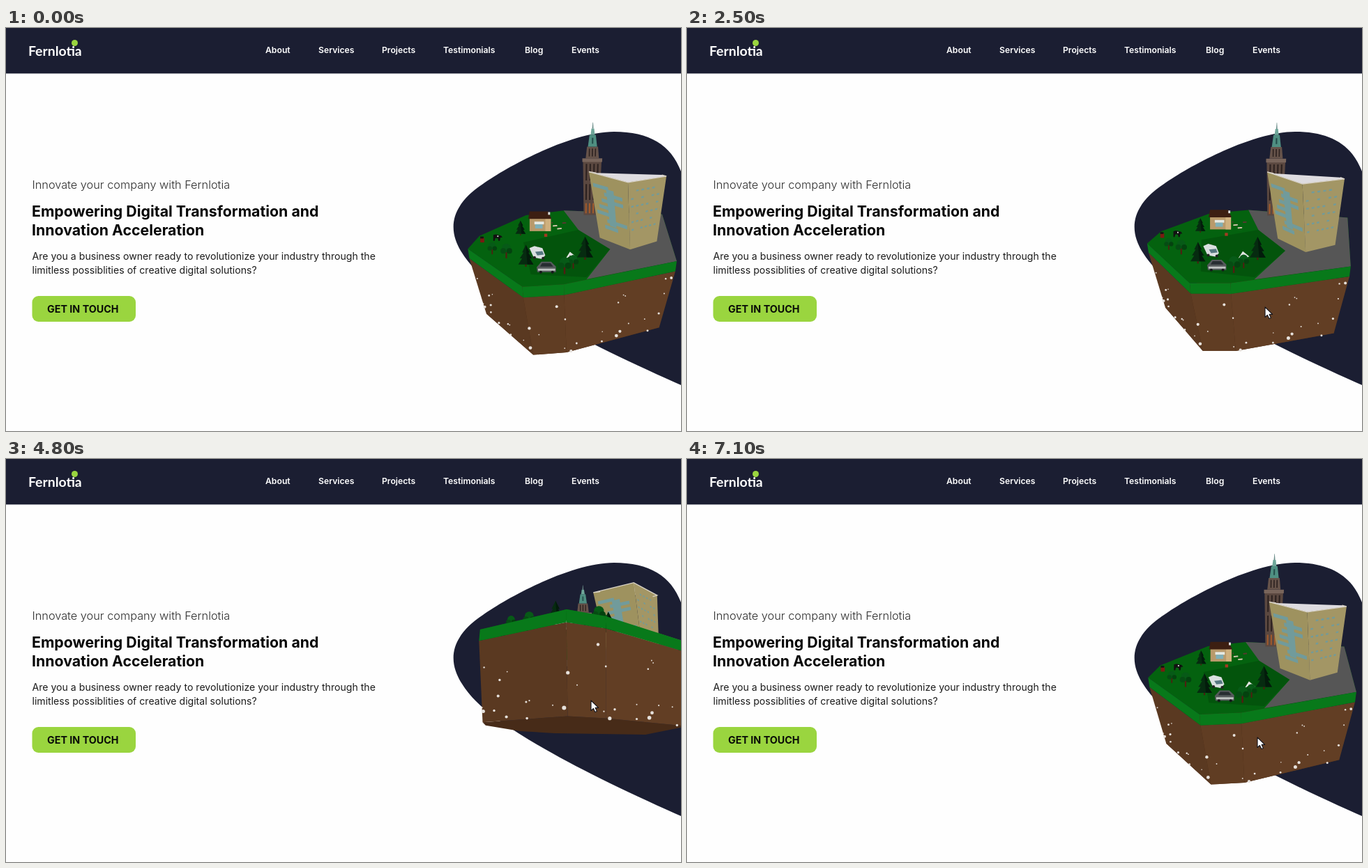
Animation, 968 px wide and 579 px high, one loop 7.2 s. Source, as an HTML page:

```html
<!DOCTYPE html>
<html lang="en">
<head>
<meta charset="utf-8">
<title>Fernlotia</title>
<style>
html, body { margin: 0; width: 100%; height: 100%; overflow: hidden; background: #fefefe; }
svg { display: block; width: 968px; height: 579px; font-family: Inter, sans-serif; }
.nav { font-size: 12.2px; font-weight: 600; fill: #fff; }
.head { font-size: 21.3px; font-weight: 700; fill: #060606; }
.body { font-size: 14.1px; fill: #1c1c1c; }
</style>
</head>
<body>
<svg viewBox="0 0 968 579">
  <rect width="968" height="579" fill="#fefefe"/>
  <rect width="968" height="65.4" fill="#1b1e32"/>
  <text x="32" y="40" font-size="19.4" font-weight="700" fill="#fff" style="font-family:Lato,sans-serif">Fernlotia</text>
  <circle cx="98.5" cy="21.5" r="4.5" fill="#9ad53f"/>
  <g class="nav">
    <text x="372" y="36">About</text><text x="448" y="36">Services</text>
    <text x="539" y="36">Projects</text><text x="627" y="36">Testimonials</text>
    <text x="744" y="36">Blog</text><text x="811" y="36">Events</text>
  </g>
  <text x="37.5" y="230.5" font-size="16.3" font-weight="300" fill="#2c2c2c">Innovate your company with Fernlotia</text>
  <g class="head">
    <text x="37" y="271">Empowering Digital Transformation and</text>
    <text x="37" y="297.5">Innovation Acceleration</text>
  </g>
  <g class="body">
    <text x="37.5" y="332.5">Are you a business owner ready to revolutionize your industry through the</text>
    <text x="37.5" y="353">limitless possiblities of creative digital solutions?</text>
  </g>
  <rect x="37.5" y="385" width="148.5" height="37" rx="9" fill="#9ad53f"/>
  <text x="59" y="408.8" font-size="14.3" font-weight="700" fill="#0a0d08">GET IN TOUCH</text>
  <path d="M970 212C957 170 925 149 872 149C812 149 722 197 684 224C630 260 638 296 652 320C665 342 685 360 708 376C770 420 862 466 970 514Z" fill="#1b1e32"/>
  <g id="scene"></g>
  <path id="cursor" d="M0 0V14.5L3.4 11.4L5.8 16.6L8.4 15.4L6.1 10.4H10.6Z" fill="#fff" stroke="#15151c" stroke-width="1.1" stroke-linejoin="round"/>
</svg>
<script>
const scene = document.getElementById('scene');
const cursor = document.getElementById('cursor');

// Time, yaw and pitch in degrees, pointer x and y.
const keys = [
  [0, 0, 25, 818, 401],
  [1300, -7, 25, 801, 399],
  [1900, 5, 26, 822, 403],
  [2500, -6, 25, 829, 401],
  [2900, 9, 28, 850, 402],
  [3900, 26, 12, 846, 371],
  [4800, 17, -17, 839, 347],
  [5600, 9, -5, 825, 377],
  [6450, 0, 28, 824, 406],
  [7100, -1.5, 23.8, 818, 400],
  [7200, -1.5, 23.8, 818, 400]
];

// Ground plans as x,z; z points to the viewer, y is up.
const rim = [[-160, 80], [-67, 175], [-17, 170], [135, 115], [151, -49], [-26, -66], [-92, -44], [-154, 38]];
const road = [[-26, -66], [151, -49], [135, 115], [11, 159], [47, 81], [1, 16]];
const glade = [[1, 16], [47, 81], [11, 154], [-60, 148], [-82, 60]];
const TURF = -16, BOTTOM = -121;
const TOWER = { x: 24, z: -45, h: 160 };
const ROOF = 103;
// Things on the grass, back to front: kind, x, z, size.
const things = [
  ['crowd', -31, 10, 1], ['house', -61, 21, 1.1], ['pine', -90, 36, .8], ['cow', -124, 48, 1],
  ['barn', -144, 60, 1], ['tree', -121, 96, .7], ['tree', -99, 107, .85], ['van', -56, 107, 1],
  ['tent', -9, 109, .9], ['pine', 10, 111, 1.1], ['pine', -69, 129, 1], ['tree', -6, 134, .75],
  ['car', -41, 139, .9], ['tree', -17, 147, .9]
];

let seed = 11;
const rnd = () => (seed = seed * 16807 % 2147483647) / 2147483647;
const mix = (a, b, t) => a + (b - a) * t;
const mixPt = (a, b, t) => a.map((n, i) => mix(n, b[i], t));
const quad = (a, b, c, d, u, v) => mixPt(mixPt(a, b, u), mixPt(d, c, u), v);
const pts = list => list.map(p => p[0].toFixed(1) + ',' + p[1].toFixed(1)).join(' ');
const poly = (list, fill) => `<polygon points="${pts(list)}" fill="${fill}"/>`;
const dot = (x, y, r, fill) => `<circle cx="${x.toFixed(1)}" cy="${y.toFixed(1)}" r="${r.toFixed(1)}" fill="${fill}"/>`;
const box = (x, y, w, h, fill) => `<rect x="${x}" y="${y}" width="${w}" height="${h}" fill="${fill}"/>`;
const shape = (d, fill) => `<path d="${d}" fill="${fill}"/>`;

// Stones gather near the foot of each wall.
const stones = rim.map((a, i) => {
  const b = rim[(i + 1) % rim.length];
  const count = Math.round(Math.hypot(a[0] - b[0], a[1] - b[1]) / 10);
  return Array.from({ length: count }, () => [rnd(), 1 - .9 * rnd() ** 2, .8 + 1.8 * rnd() ** 2]);
});

function stateAt(t) {
  let i = 0;
  while (i < keys.length - 2 && t >= keys[i + 1][0]) i++;
  const a = keys[i], b = keys[i + 1];
  let k = (t - a[0]) / (b[0] - a[0]);
  k = k * k * (3 - 2 * k);
  return mixPt(a, b, k).slice(1);
}

// Orbiting perspective camera; returns screen x, y and scale.
function camera(yaw, pitch) {
  const rad = Math.PI / 180;
  const sy = Math.sin(yaw * rad), cy = Math.cos(yaw * rad);
  const sp = Math.sin(pitch * rad), cp = Math.cos(pitch * rad);
  return (x, y, z) => {
    const side = x * cy + z * sy, near = z * cy - x * sy;
    const k = 500 / (580 - y * sp - near * cp);
    return [820 + side * k, 284 - (y * cp - near * sp) * k, k];
  };
}

const crowd = Array.from({ length: 18 }, (_, i) =>
  dot(i * 7.3 % 23 - 11, i * 4.7 % 14 - 9, 1.1, i % 3 ? '#d8c8b0' : '#5a3a30')).join('');

const art = {
  pine: box(-1, -5, 2, 5, '#4a1c12') +
    shape('M0 -29L5 -19H3L8 -11H5L10 -3H-10L-5 -11H-8L-3 -19H-5Z', '#062b10') +
    shape('M0 -29L5 -19H3L8 -11H5L10 -3H2Z', '#031b0b'),
  tree: box(-1.2, -10, 2.4, 10, '#511d12') + dot(0, -17, 7, '#075a17') +
    dot(-5, -12, 4.5, '#064c13') + dot(5, -12, 4.5, '#04420f'),
  house: box(-15, -19, 31, 19, '#b99a6b') + box(8, -19, 8, 19, '#d0b17e') +
    shape('M-15 -29H12L17 -18H-17Z', '#3d1f12') + box(-8, -14, 14, 4, '#e6e9e2') +
    box(-7, -10, 11, 6, '#7fb0b8') + box(12, -28, 3, 4, '#ddd'),
  crowd: crowd + box(-24, 9, 5, 5, '#a33a22'),
  barn: box(-3, -7, 6, 7, '#7a1a12') + box(-3, -9, 5, 3, '#141414'),
  cow: shape('M-6 -6L-2 -7L6 -5L8 -2H5L4 3H2L1 -1L-3 -1L-4 3H-6Z', '#111') + box(0, -5, 2, 2, '#ddd'),
  tent: shape('M-9 0L-2 -11L8 -3L3 -1L-3 -4Z', '#e4e6e4') + shape('M-4 0L-2 -6L3 -1Z', '#16361a'),
  van: shape('M-11 -14L-4 -17L7 -14L11 -4L6 1L-5 -1Z', '#dadfe0') +
    shape('M-3 -9L7 -10L9 -5L0 -4Z', '#567780') + dot(-4, -1, 2, '#222') + dot(8, 0, 2, '#222'),
  car: shape('M-14 -5L-7 -13H7L14 -6V2H-13Z', '#555a5c') +
    shape('M-6 -11H6L10 -6H-9Z', '#272d31') + box(-12, -3, 25, 3, '#bfc3c2') +
    dot(-8, 2, 2, '#16181a') + dot(9, 2, 2, '#16181a')
};

function tower(cam) {
  const at = (t, w) => {
    const [x, y, k] = cam(TOWER.x, TOWER.h * t, TOWER.z);
    return [x + w * k, y];
  };
  const stage = (t0, w0, t1, w1, fill, x = 0) =>
    poly([at(t0, x - w0), at(t1, x - w1), at(t1, x + w1), at(t0, x + w0)], fill);
  let s = stage(0, 13.5, .63, 15.5, '#5b4840') + stage(.6, 16.5, .64, 16.5, '#79655b') +
    stage(.64, 11, .76, 9, '#66534a') + stage(.76, 7.5, .88, 5, '#4f8f82') +
    stage(.88, 3.4, .94, 2.2, '#6fa79a') + stage(.94, 1.1, 1, .3, '#6c8e8a');
  for (const x of [-9.5, -3.2, 3.2, 9.5]) {
    s += stage(.18, 1.2, .36, 1.2, '#2c211f', x) + stage(.4, 1.2, .58, 1.2, '#2c211f', x) +
      stage(.02, 1.2, .14, 1.2, '#a55b2a', x);
  }
  for (const x of [-5, 0, 5]) s += stage(.66, .9, .74, .9, '#2c211f', x);
  return s + stage(.79, 1.2, .85, 1.2, '#25504d');
}

function office(cam) {
  const top = (x, z) => cam(x, ROOF, z), foot = (x, z) => cam(x, 0, z);
  const tl = top(16, 36), tf = top(66, 86), tr = top(123, 58);
  const bl = foot(34, 44), bf = foot(76, 82), br = foot(120, 56);
  const pane = (a, b, c, d, u, v, w, h) => poly([[u, v], [u + w, v], [u + w, v + h], [u, v + h]]
    .map(q => quad(a, b, c, d, ...q)), '#719b9b');
  const rear = [top(26, 42), top(118, 52)];
  let s = poly([tl, ...rear, tr, tf], '#dedce0') +
    poly([tl, tf, bf, bl], '#9e925f') + poly([tf, tr, br, bf], '#a39665');
  for (let r = 0; r < 7; r++) s += pane(tl, tf, bf, bl, .06 + r * 3 % 4 * .09, .16 + r * .1, .4 + r % 3 * .1, .055);
  s += pane(tl, tf, bf, bl, .4, .2, .2, .55);
  for (let r = 0; r < 6; r++) for (let c = 0; c < 6; c++)
    if ((r * 5 + c * 3) % 7 > 1) s += pane(tf, tr, br, bf, .07 + c * .145, .13 + r * .115, .07, .025);
  return s + `<polyline points="${pts([rear[0], tl, tf, tr, rear[1]])}" fill="none" stroke="#d8d2c6" stroke-width="1.3"/>`;
}

function walls(cam, base) {
  let soil = '', turf = '', specks = '';
  rim.forEach((p, i) => {
    const j = (i + 1) % rim.length, q = rim[j];
    const a = cam(p[0], TURF, p[1]), b = cam(q[0], TURF, q[1]), c = base[j], d = base[i];
    const facing = (c[0] - a[0]) * (d[1] - b[1]) - (c[1] - a[1]) * (d[0] - b[0]) > 0;
    if (!facing) return;
    const light = 25.5 + 2 * Math.sin(Math.atan2(p[1] - q[1], q[0] - p[0]));
    soil += poly([a, b, c, d], `hsl(25 46% ${light.toFixed(1)}%)`);
    turf += poly([cam(p[0], 0, p[1]), cam(q[0], 0, q[1]), b, a], '#08791a');
    for (const [u, v, r] of stones[i]) {
      const [x, y, k] = quad(a, b, c, d, u, v);
      specks += dot(x, y, r * k, '#e6e1dc');
    }
  });
  return soil + turf + specks;
}

function draw(t) {
  const [yaw, pitch, mx, my] = stateAt(t);
  const cam = camera(yaw, pitch);
  const ground = plan => plan.map(([x, z]) => cam(x, 0, z));
  const base = rim.map(([x, z]) => cam(x * .92, BOTTOM, mix(40, z, .92)));
  let s = poly(base, '#472b18') + poly(ground(rim), '#04620f') +
    poly(ground(glade), '#03540c') + poly(ground(road), '#565656') + tower(cam) + office(cam);
  for (const [kind, x, z, size] of things) {
    const [px, py, k] = cam(x, 0, z);
    s += `<g transform="translate(${px.toFixed(1)} ${py.toFixed(1)}) scale(${(size * k).toFixed(3)})">${art[kind]}</g>`;
  }
  scene.innerHTML = s + walls(cam, base);
  cursor.setAttribute('transform', `translate(${mx.toFixed(1)} ${my.toFixed(1)})`);
  cursor.setAttribute('visibility', t < 300 ? 'hidden' : 'visible');
}

let last = -1;
function tick() {
  const t = Math.floor(performance.now() % 7200 / 100) * 100;
  if (t !== last) draw(last = t);
  requestAnimationFrame(tick);
}
tick();
</script>
</body>
</html>
```
